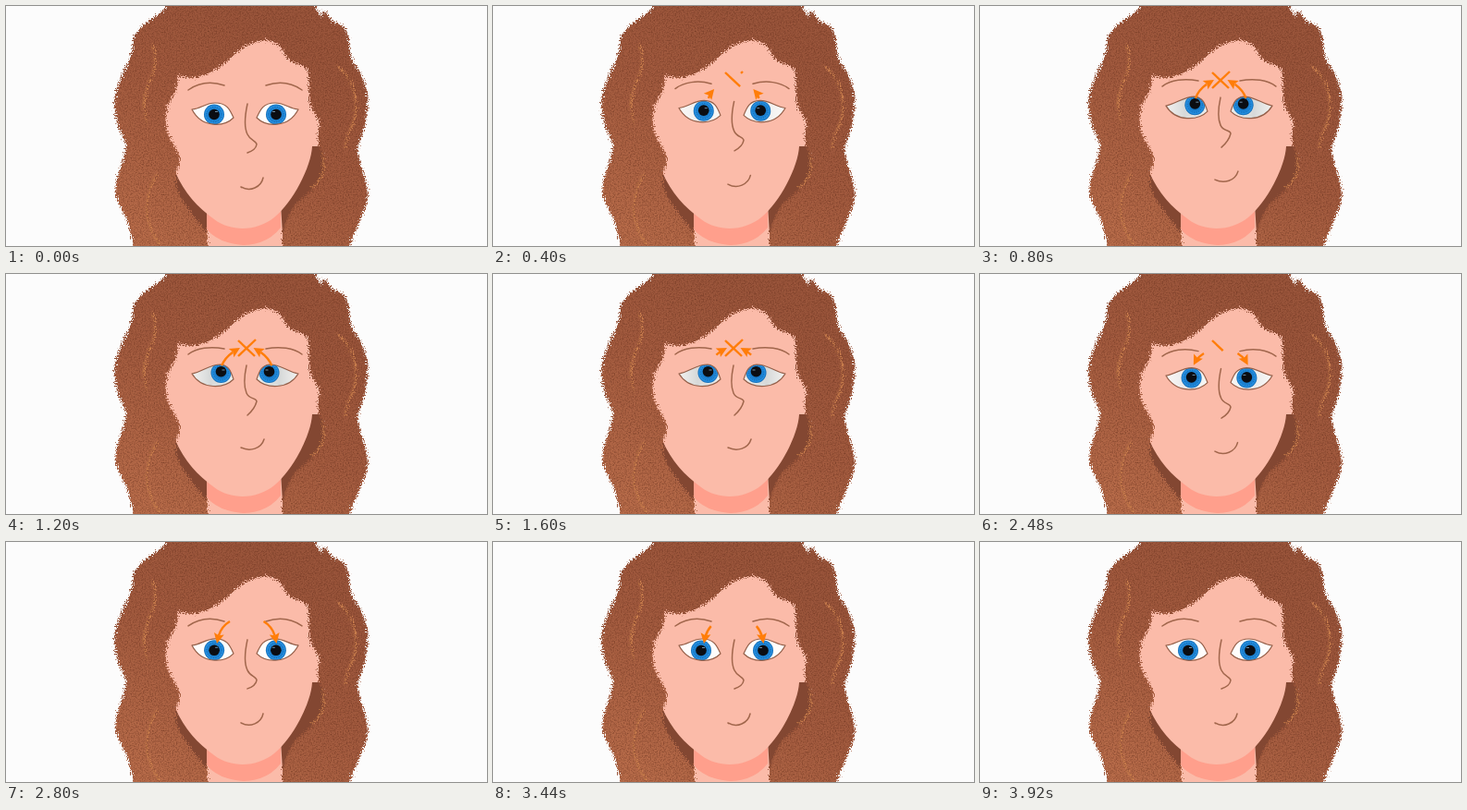
Recreate the animation shown at these times as an HTML page. Size 520 by 260 pixels, loop 4000 ms.

```html
<!DOCTYPE html>
<html lang="en">
<head>
<meta charset="utf-8">
<title>Eye exercise</title>
<style>
  html, body { margin: 0; height: 100%; overflow: hidden; background: #fcfcfc; }
  svg { display: block; width: 520px; height: 260px; }
  .line { fill: none; stroke: #a1664c; stroke-width: 1.5; stroke-linecap: round; stroke-linejoin: round; }
  .strand { fill: none; stroke: #cd814f; stroke-width: 1.6; }
  .mark { fill: none; stroke: #ff7d08; stroke-width: 2.4; }
  .head { fill: #ff7d08; }
</style>
</head>
<body>
<svg viewBox="0 0 520 260">
  <defs>
    <linearGradient id="hairTone" gradientUnits="userSpaceOnUse" x1="150" y1="250" x2="290" y2="20">
      <stop offset="0" stop-color="#b86c4a"/>
      <stop offset=".55" stop-color="#a35b3f"/>
      <stop offset="1" stop-color="#9a553b"/>
    </linearGradient>
    <linearGradient id="scleraTone" x1="0" y1="0" x2="1" y2="0">
      <stop offset="0" stop-color="#f2f2f0"/>
      <stop offset=".45" stop-color="#d6d8d8"/>
      <stop offset="1" stop-color="#eeeeec"/>
    </linearGradient>
    <radialGradient id="irisTone">
      <stop offset=".45" stop-color="#1676c4"/>
      <stop offset=".85" stop-color="#2590e2"/>
      <stop offset="1" stop-color="#1268b0"/>
    </radialGradient>
    <filter id="rough" filterUnits="userSpaceOnUse" x="90" y="-30" width="330" height="320" color-interpolation-filters="sRGB">
      <feTurbulence type="fractalNoise" baseFrequency=".7" numOctaves="2" seed="4" result="noise"/>
      <feDisplacementMap in="SourceGraphic" in2="noise" scale="10" xChannelSelector="R" yChannelSelector="G" result="shape"/>
      <feColorMatrix in="noise" values="0 0 0 0 .35  0 0 0 0 .15  0 0 0 0 .08  1.1 0 0 0 -.45"/>
      <feComposite in2="shape" operator="in" result="grain"/>
      <feMerge><feMergeNode in="shape"/><feMergeNode in="grain"/></feMerge>
    </filter>
    <clipPath id="eyeClip"><path class="lid"/></clipPath>
  </defs>

  <!-- back hair, neck and face -->
  <path fill="#834732" d="M180 175L218 222V262H200L182 205ZM328 152H342L350 180L310 262H296V215Z"/>
  <path fill="#fbbba9" d="M217 215H297L300 262H217Z"/>
  <path fill="#ff9f8c" d="M217 220H297V240Q283 258 258 259Q231 258 217 242Z"/>
  <path fill="#fbbba9" d="M165 30H342V152H331C330 174 310 213 290 229C273 243 245 246 225 231C207 218 193 203 183 180V165H168Z"/>

  <g filter="url(#rough)">
    <path fill="url(#hairTone)" d="M173 -20V1C168 12 144 16 137 38C139 54 126 70 119 92C114 114 121 132 130 150C129 170 115 188 119 205C124 224 140 238 138 280
      H218V246C208 234 190 214 184 196V180C192 165 186 158 181 150C172 136 171 122 175 108C182 96 186 88 186 75
      C200 81 215 76 228 68C244 58 252 43 270 39C286 34 298 40 303 56C309 63 320 63 326 68C329 84 325 98 331 112C336 120 340 124 338 134L337 150
      C344 160 347 172 344 180C338 198 315 208 308 222C302 233 299 242 299 250V280H369C369 250 389 230 391 205C391 186 380 168 380 152C386 140 390 124 391 108C392 92 387 76 375 60C369 50 374 36 366 24C360 18 353 18 350 13L344 4L341 12L335 0V-20Z"/>
    <path class="strand" d="M158 42C169 68 148 84 149 108L152 126M164 180C154 198 150 214 153 230Q157 248 166 258M357 64C374 78 379 94 378 114C377 130 366 138 367 154M342 160Q348 184 330 197"/>
  </g>

  <!-- moving features -->
  <g id="half">
    <path class="line" id="brow"/>
    <g clip-path="url(#eyeClip)">
      <path class="lid" fill="#fffdfc"/>
      <path class="lid" id="shade" fill="url(#scleraTone)"/>
      <g id="iris">
        <circle r="11" fill="url(#irisTone)"/>
        <circle r="8.2" fill="none" stroke="#0f589b" stroke-width=".8" stroke-dasharray="1 1.6"/>
        <circle id="pupil" r="5.8" fill="#0b0d12"/>
        <path d="M1-3h3" stroke="#6f8ea6" stroke-width="1"/>
      </g>
    </g>
    <path class="lid line" style="stroke:#94604a;stroke-width:1.2"/>
  </g>
  <use href="#half" transform="translate(517) scale(-1 1)"/>
  <path class="line" id="nose"/>
  <path class="line" id="mouth"/>

  <path class="mark" id="cross1" pathLength="1" d="M251 72L269 89"/>
  <path class="mark" id="cross2" pathLength="1" d="M270 71L251 89"/>
  <g id="arrow">
    <path class="mark" id="shaft"/>
    <path class="head" id="head" d="M0 0L-11 5.5L-9 0L-11-5.5Z"/>
  </g>
  <use href="#arrow" transform="translate(520.5) scale(-1 1)"/>
</svg>

<script>
const LOOP = 4000, HALF = 2000, STEP = 80;
const $ = id => document.getElementById(id);
const lids = document.querySelectorAll('.lid');
const lerp = (a, b, k) => a + (b - a) * k;

// Eased progress of t between two times
const ease = (t, from, to) => {
  const u = Math.min(1, Math.max(0, (t - from) / (to - from)));
  return u * u * (3 - 2 * u);
};

// Blend two paths that share the same commands
const NUMBER = /-?[\d.]+/g;
const blend = ([a, b], k) => {
  const ends = b.match(NUMBER);
  let i = 0;
  return a.replace(NUMBER, n => lerp(+n, +ends[i++], k).toFixed(2));
};

// Each pair: looking ahead, looking up and inward
const poses = {
  lid: ['M201 112C211 111 216 105 226 105C239 105 242 112 246 121C236 131 212 133 201 112Z',
        'M201 108C212 106 220 98 232 98C241 99 243 105 246 114C236 124 212 126 201 108Z'],
  brow: ['M197 91C207 84 221 81 236 86', 'M197 87C206 80 221 78 236 81'],
  nose: ['M261 106C258 120 258 133 261 139C264 146 271 146 271 150Q270 156 261 159',
         'M260 99C257 113 257 122 260 129C263 136 271 134 271 138Q269 146 261 153'],
  mouth: ['M254 196C264 202 276 196 278 186', 'M254 188C264 193 276 189 279 179']
};

// Quadratic curves: start, control, tip
const upArrow = [[233, 100], [237, 88], [253, 80]];
const downArrow = [[242, 86], [230, 93], [228, 110]];

const mix = (p, q, k) => [lerp(p[0], q[0], k), lerp(p[1], q[1], k)];

function drawArrow([a, c, b], tail, tip) {
  const size = Math.min(1, (tip - tail) / .4);
  $('arrow').style.display = size > .06 ? '' : 'none';
  const at = u => mix(mix(a, c, u), mix(c, b, u), u);
  const neck = lerp(tail, tip, .72);
  const start = at(tail), base = at(neck), end = at(tip);
  const bend = mix(mix(a, c, tail), mix(c, b, tail), neck);
  const angle = Math.atan2(end[1] - base[1], end[0] - base[0]) * 180 / Math.PI;
  $('shaft').setAttribute('d', `M${start}Q${bend} ${base}`);
  $('head').setAttribute('transform', `translate(${end}) rotate(${angle}) scale(${size})`);
}

function drawCross(id, shown) {
  $(id).style.strokeDasharray = `${shown} 2`;
  $(id).style.display = shown > .01 ? '' : 'none';
}

function draw(time) {
  const t = Math.floor(time % LOOP / STEP) * STEP;
  const rising = t < HALF, phase = t % HALF;
  const moved = ease(phase, 80, 860);
  const k = rising ? moved : 1 - moved;

  const lid = blend(poses.lid, k);
  lids.forEach(e => e.setAttribute('d', lid));
  for (const id of ['brow', 'nose', 'mouth']) $(id).setAttribute('d', blend(poses[id], k));
  $('shade').style.opacity = k;
  $('iris').setAttribute('transform', `translate(${lerp(225, 232.5, k)} ${lerp(117.5, 107, k)})`);
  $('pupil').setAttribute('cy', lerp(0, -1.3, k));

  drawCross('cross1', rising ? ease(phase, 80, 480) : 1 - ease(phase, 320, 720));
  drawCross('cross2', rising ? ease(phase, 320, 720) : 1 - ease(phase, 80, 480));
  drawArrow(rising ? upArrow : downArrow, ease(phase, 1120, 2000), ease(phase, 80, 760));
}

function loop() {
  draw(performance.now());
  requestAnimationFrame(loop);
}
loop();
</script>
</body>
</html>
```
